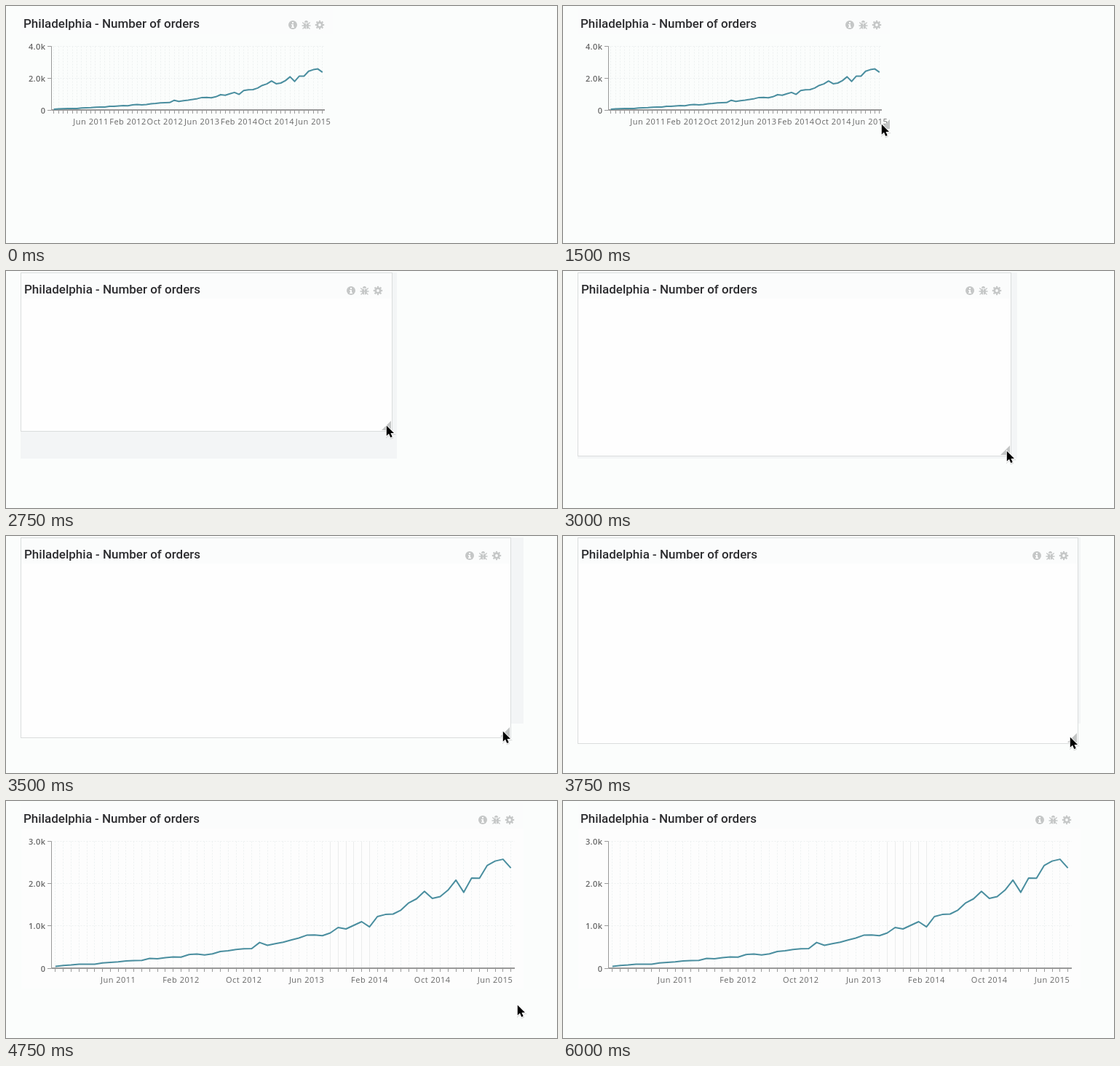
Recreate the animation shown at these times as an HTML page. Size 757x326 px, loop 6.75 s.

```html
<!DOCTYPE html>
<html lang="en">
<head>
<meta charset="utf-8">
<title>Resizing a chart panel</title>
<style>
  html, body { margin: 0; width: 100%; height: 100%; overflow: hidden; background: #fbfdfc; }
  svg { display: block; }
  .title { font: 500 17px Roboto, sans-serif; fill: #2c2c2f; }
  .label { font: 11px "Open Sans", sans-serif; letter-spacing: .5px; fill: #666; text-anchor: middle; }
  .value { font: 600 11px "Open Sans", sans-serif; letter-spacing: .4px; fill: #666; text-anchor: end; }
  .grid { stroke: #edf0f0; stroke-dasharray: 2 2; fill: none; }
  .solid { stroke: #ebeded; fill: none; }
  .axis { stroke: #999; fill: none; }
  .line { stroke: #4a8e9f; stroke-width: 2; stroke-linejoin: round; fill: none; }
</style>
</head>
<body>
<svg id="stage" width="757" height="326" viewBox="0 0 757 326">
  <rect width="757" height="326" fill="#fbfdfc"/>
  <rect id="slot" x="20" y="2" fill="#f3f5f6"/>
  <rect id="body" x="20" y="2"/>
  <rect id="head" x="21" y="3" height="35" fill="#fbfcfc"/>
  <path id="rule" class="grid"/>
  <g id="small"></g>
  <g id="large"></g>
  <text id="title" class="title">Philadelphia - Number of orders</text>
  <g id="icons" fill="#c5c7c7">
    <circle r="6"/>
    <path d="M-1-4H1V-2H-1ZM-2-1H1V2.5H2V4H-2V2.5H-1V.5H-2Z" fill="#fcfdfd"/>
    <g transform="translate(18.5 0)">
      <path d="M-2.5-3.2A2.5 2.8 0 0 1 2.5-3.2ZM-3.3-2.2H-.4V5.6Q-3.3 5-3.3 2ZM3.3-2.2H.4V5.6Q3.3 5 3.3 2Z"/>
      <path d="M-5.2-3.6L-3-1.6M5.2-3.6L3-1.6M-6 1H6M-5 5.4L-2.6 3.2M5 5.4L2.6 3.2" stroke="#c5c7c7" stroke-width="1.3"/>
    </g>
    <g transform="translate(37 0)" fill="none" stroke="#c5c7c7">
      <circle r="3.3" stroke-width="2.8"/>
      <circle r="5.2" stroke-width="2" pathLength="16" stroke-dasharray="1 1" stroke-dashoffset=".5"/>
    </g>
  </g>
  <path id="grip" d="M0-13V0H-13Z" fill="#c3c5c5"/>
  <g id="cursor">
    <path d="M1 2V16L4.2 13 6.5 18.3 9 17.3 6.8 12.2H11.4Z" stroke="#000" stroke-width="2" opacity=".13"/>
    <path d="M.8 .8V14.8L4 11.8 6.3 17 8.7 16 6.5 11H11Z" stroke="#fff" stroke-width="1.8" paint-order="stroke"/>
  </g>
</svg>
<script>
const LOOP = 6750;
const LEFT = 62.5, TOP = 55.5;
const el = id => document.getElementById(id);

// Monthly orders, October 2010 to August 2015
const orders = [
  43, 64, 76, 94, 93, 94, 125, 137, 151, 172, 180, 186, 232, 223, 249, 268, 263, 323, 337, 314,
  340, 395, 412, 442, 460, 464, 608, 541, 579, 613, 667, 713, 780, 787, 768, 833, 962, 928, 1014, 1100,
  979, 1220, 1271, 1280, 1374, 1546, 1641, 1818, 1650, 1692, 1847, 2084, 1795, 2130, 2127, 2431, 2534, 2577, 2371
];
const months = ["Jun 2011", "Feb 2012", "Oct 2012", "Jun 2013", "Feb 2014", "Oct 2014", "Jun 2015"];

function chart(right, base, max, step, firstSolid, lastSolid) {
  const band = (right - LEFT) / orders.length;
  const xAt = i => LEFT + (i + .5) * band;
  const yAt = v => base - v / max * (base - TOP);
  const snap = v => Math.floor(v) + .5;
  let grid = "", solid = "", axis = `M${LEFT} ${TOP}V${base}`, text = "";
  orders.forEach((v, i) => {
    const x = snap(xAt(i));
    const bar = `M${x} ${TOP}V${base}`;
    if (i >= firstSolid && i <= lastSolid) solid += bar;
    else grid += bar;
    axis += `M${x} ${base}v5`;
  });
  for (let v = 0; v <= max; v += step) {
    const y = snap(yAt(v));
    if (v) grid += `M${LEFT} ${y}H${right}`;
    axis += `M57 ${y}H${LEFT}`;
    text += `<text class="value" x="54.4" y="${y + 4.5}">${v ? (v / 1000).toFixed(1) + "k" : 0}</text>`;
  }
  months.forEach((m, i) => {
    text += `<text class="label" x="${xAt(8 + 8 * i)}" y="${base + 20}">${m}</text>`;
  });
  const line = orders.map((v, i) => `${xAt(i).toFixed(1)},${yAt(v).toFixed(1)}`).join(" ");
  return `<path class="grid" d="${grid}"/><path class="solid" d="${solid}"/><path class="axis" d="${axis}"/>` +
    `<path class="axis" stroke-width="1.8" d="M${LEFT} ${base}H${right}"/>` +
    `<polyline class="line" points="${line}"/>${text}`;
}
el("small").innerHTML = chart(438, 143, 4000, 2000, -1, -1);
el("large").innerHTML = chart(699, 230, 3000, 1000, 35, 40);

// start, mode, pointer x, y, panel right, bottom, slot right, bottom
const steps = [
  [0, "idle", -40, 0, 450, 171],
  [500, "idle", 531, 80, 450, 171],
  [750, "idle", 496, 177, 450, 171],
  [1250, "idle", 452, 173, 450, 171],
  [1500, "near", 437, 162, 450, 171],
  [1750, "near", 432, 157, 450, 171],
  [2000, "near", 430, 160, 450, 171],
  [2250, "hover", 436, 161, 450, 171],
  [2500, "drag", 441, 170, 453, 179, 450, 171],
  [2750, "drag", 522, 212, 531, 221, 537, 258],
  [3000, "drag", 609, 247, 616, 255, 624, 258],
  [3250, "drag", 652, 263, 662, 272, 624, 258],
  [3500, "drag", 682, 268, 694, 278, 711, 258],
  [3750, "drag", 696, 276, 708, 286, 711, 258],
  [4000, "drag", 701, 278, 714, 288, 711, 258],
  [4500, "drag", 701, 280, 714, 290, 711, 258],
  [4750, "done", 702, 280, 711, 258],
  [5750, "done", 746, 262, 711, 258],
  [6000, "done", -40, 0, 711, 258]
];

const set = (id, attrs) => {
  for (const k in attrs) el(id).setAttribute(k, attrs[k]);
};
const show = (id, on) => set(id, { visibility: on ? "visible" : "hidden" });
const move = (id, x, y) => set(id, { transform: `translate(${x} ${y})` });

function draw(t) {
  const [, mode, px, py, right, bottom, slotX = 20, slotY = 2] = steps.findLast(s => s[0] <= t);
  const drag = mode === "drag", done = mode === "done", hover = mode === "hover";
  const nudge = drag ? 1 : 0;
  set("slot", { width: slotX - 20, height: slotY - 2 });
  set("body", drag
    ? { x: 20.5, y: 2.5, width: right - 21, height: bottom - 3, fill: "#fefefe", stroke: "#dadddd" }
    : { x: 21, y: 38, width: right - 21, height: bottom - 38, fill: "#fdfdfd", stroke: "none" });
  show("body", drag || done || hover);
  set("head", { width: right - 22 });
  set("rule", { d: `M21 38.5H${right}` });
  show("rule", hover);
  show("small", !drag && !done);
  show("large", done);
  move("title", 24 + nudge, 30 + nudge);
  move("icons", right - 56 - nudge, 26 + nudge);
  move("grip", right - (drag ? 2 : 1), bottom - 2);
  show("grip", drag || hover || mode === "near");
  move("cursor", px, py);
}

function tick(now) {
  draw(now % LOOP);
  requestAnimationFrame(tick);
}
draw(0);
requestAnimationFrame(tick);
</script>
</body>
</html>
```
